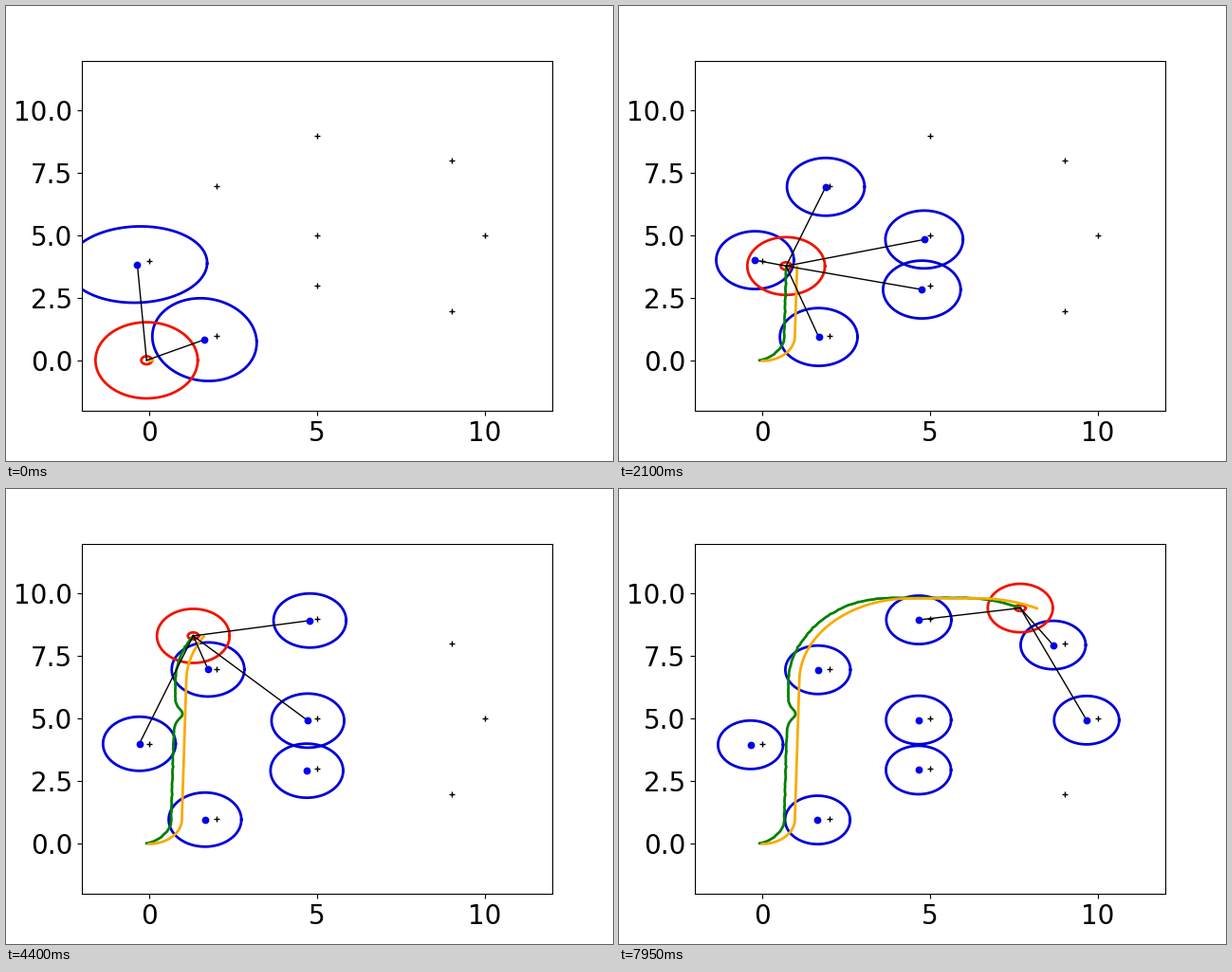
Recreate the animation shown at these times as a matplotlib script. Size 640 by 480 pixels, loop 8 s.

```python
import numpy as np
import matplotlib.pyplot as plt
from matplotlib.animation import FuncAnimation

FRAMES, INTERVAL = 160, 50
STEP = 0.1005
SENSOR_RANGE = 5.0
BLUE, DOT, RED = "#0000d8", "#0000f0", "#f01400"
GREEN, ORANGE = "#008000", "#f7ab05"

landmarks = np.array([(2, 1), (0, 4), (5, 3), (5, 5), (2, 7),
                      (5, 9), (9, 8), (10, 5), (9, 2)], float)
angle = np.linspace(0, 2 * np.pi, 121)
circle = np.column_stack([np.cos(angle), np.sin(angle)])


def drive():
    """True path: left bend, straight, right bend, straight, slight right."""
    frames = np.array([15, 56, 51, 20, 18])
    bends = np.array([1.547, 0, -1.547, 0, -.45])
    turn = np.repeat(bends / frames, frames)
    heading = np.cumsum(turn) - turn / 2
    steps = STEP * np.column_stack([np.cos(heading), np.sin(heading)])
    return np.vstack([[0, 0], np.cumsum(steps, axis=0)])


def smooth(t):
    t = np.clip(t, 0, 1)
    return t * t * (3 - 2 * t)


def robot_path(truth):
    """Estimated path: lags to the left, with one stumble and a late slip."""
    i = np.arange(FRAMES)
    dx = (-.32 + .15 * np.exp(-i / 4) + .24 * np.exp(-((i - 56) / 3) ** 2)
          - .18 * smooth((i - 85) / 30))
    noise = np.random.default_rng(4).normal(0, .006, (FRAMES, 2))
    return truth[1:] + np.column_stack([dx, np.full(FRAMES, .02)]) + noise


def map_points(i):
    """Estimated landmarks: the true map shifted and slightly rotated."""
    u = max(0, (i - 18) / 24)
    tilt = -.035 * u * np.exp(1 - u)
    shift = (-.35, .05 - .2 * np.exp(-i / 4) - .09 * i / FRAMES)
    return landmarks + shift + tilt * landmarks[:, ::-1] * (-1, 1)


def spread(center, radius, origin, extra):
    """Circle stretched across the line of sight from the origin."""
    ray = center - origin
    side = np.array([-ray[1], ray[0]]) / np.hypot(*ray)
    return center + radius * circle + extra * np.outer(circle @ side, side)


truth = drive()
robot = robot_path(truth)
distance = np.linalg.norm(truth[1:, None] - landmarks, axis=2)
visible = distance < SENSOR_RANGE
known = np.maximum.accumulate(visible, axis=0)

plt.rcParams["text.kerning_factor"] = 6
fig, ax = plt.subplots(figsize=(6.4, 4.8), dpi=100, facecolor="white")
ax.set(xlim=(-2, 12), ylim=(-2, 12),
       xticks=[0, 5, 10], yticks=np.arange(0, 11, 2.5))
ax.yaxis.set_major_formatter("{x:.1f}")
ax.tick_params(labelsize=20)


def line(color, width, z, **kw):
    return ax.plot([], [], color=color, lw=width, zorder=z, **kw)[0]


ax.plot(*landmarks.T, "+", color="black", ms=4.5, mew=1, zorder=2)
rings = [line(BLUE, 2, 2.1) for _ in landmarks]
dots = [line(DOT, 0, 2.6, marker="o", ms=5.6, mew=0) for _ in landmarks]
rays = [line("black", 1, 2.5) for _ in landmarks]
robot_ring = line(RED, 2, 2.2)
robot_core = line(RED, 2, 2.3)
green_path = line(GREEN, 2, 2.35)
orange_path = line(ORANGE, 2, 2.4)


def update(i):
    # Every landmark found narrows all the uncertainties
    radius = (.22 + .106 * known[i].sum()) ** -0.5
    pos = robot[i]
    robot_ring.set_data(*(pos + radius * circle).T)
    robot_core.set_data(*(pos + (.16, .16 - .04 * i / FRAMES) * circle).T)
    green_path.set_data(*robot[:i + 1].T)
    orange_path.set_data(*truth[:i + 2].T)
    for j, mark in enumerate(map_points(i)):
        extra = .035 * distance[i, j] ** 2 * np.exp(-i / 3)
        rings[j].set_data(*spread(mark, radius, pos, extra).T)
        dots[j].set_data(*mark[:, None])
        rays[j].set_data(*np.array([pos, mark]).T)
        rings[j].set_visible(known[i, j])
        dots[j].set_visible(known[i, j])
        rays[j].set_visible(visible[i, j])
    return [*rings, *dots, *rays, robot_ring, robot_core,
            green_path, orange_path]


anim = FuncAnimation(fig, update, frames=FRAMES, interval=INTERVAL,
                     init_func=lambda: update(0), repeat=True,
                     repeat_delay=0, blit=False)
plt.show()
```
